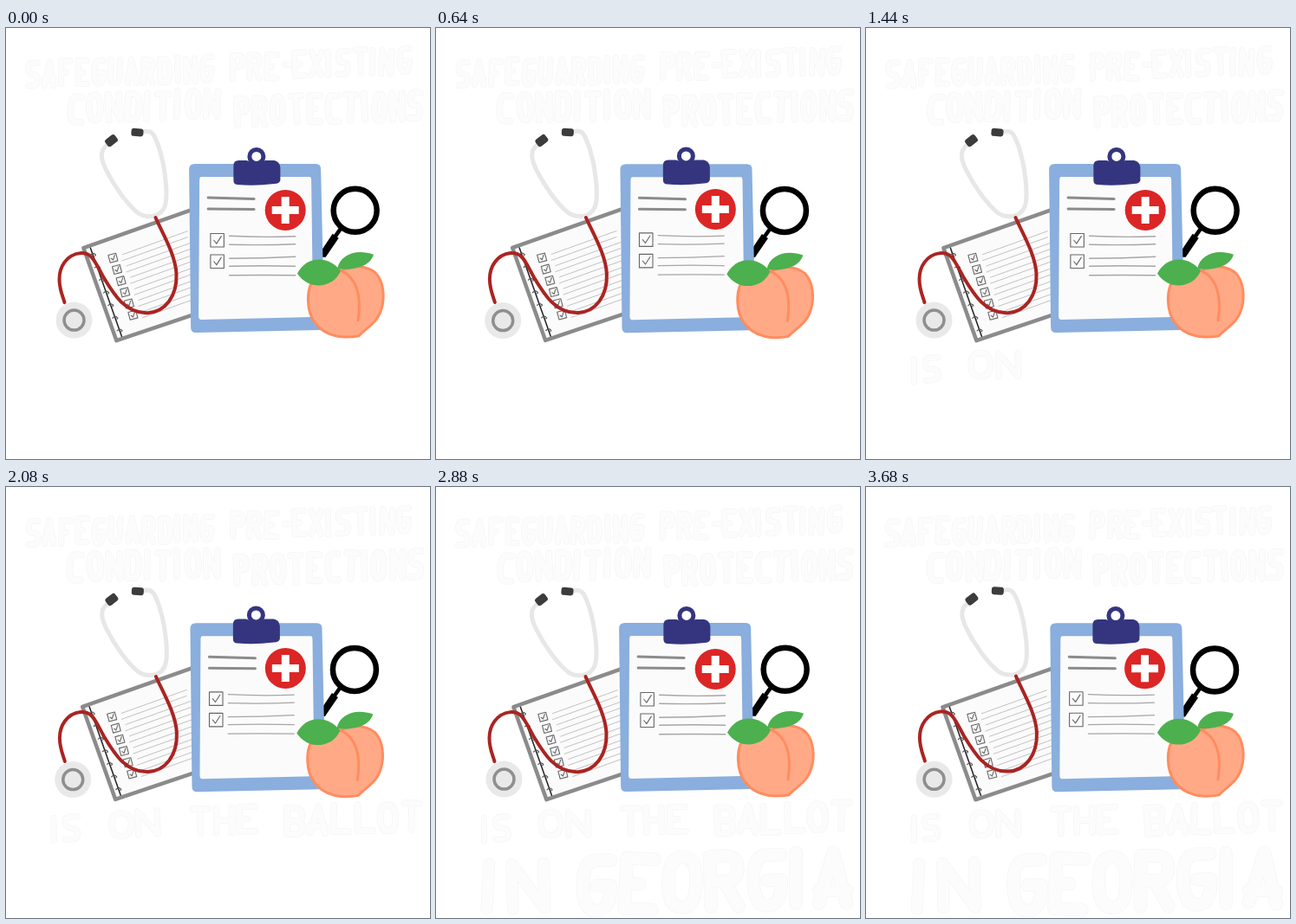
These frames come from a looping animation (489x498 px, 3.76 s). An HTML page:

```html
<!DOCTYPE html>
<html lang="en">
<head>
<meta charset="utf-8">
<title>On the ballot in Georgia</title>
<style>
  html, body { margin: 0; width: 100%; height: 100%; overflow: hidden; background: #fff; }
  svg { display: block; width: 489px; height: 498px; }
  path { stroke-linecap: round; stroke-linejoin: round; }
  .line { fill: none; }
  .paper { fill: #fbfbfb; }
  .rule { fill: none; stroke: #a6a6a6; stroke-width: 1.3; }
  .thin { fill: none; stroke: #c2c2c2; stroke-width: 1; }
  .box { fill: none; stroke: #666; stroke-width: 1.1; }
  .ring { fill: none; stroke: #555; stroke-width: 1.2; }
  .edge { fill: none; stroke: #f5f5f5; }
  .ink { fill: none; stroke: #fcfcfc; }
</style>
</head>
<body>
<svg viewBox="0 0 489 498" role="img" aria-label="Safeguarding pre-existing condition protections is on the ballot in Georgia">
  <g id="words"></g>

  <g class="part" id="notebook">
    <path class="paper" stroke="#8b8b8b" stroke-width="4.5" d="M89,254L222,207L222,329L127,361Z"/>
    <path class="line" stroke="#222" stroke-width="1.5" d="M97,254L133,356"/>
  </g>

  <g class="part line">
    <path stroke="#e7e7e7" stroke-width="5" d="M117,135C108,142 110,152 116,164C126,184 140,203 152,213C160,219 172,219 179,213C186,207 186,195 185,180C183,160 178,138 172,126C169,119 164,118 158,120"/>
    <path stroke="#aa2422" stroke-width="4" d="M173,219C181,237 196,262 197,284C198,310 184,328 164,329C138,330 125,308 113,288C103,270 100,259 86,260C70,262 62,276 62,290C62,302 66,310 68,317"/>
    <rect x="115" y="125" width="14" height="10" rx="3" fill="#3c3c3c" transform="rotate(-38 122 130)"/>
    <rect x="145" y="116" width="14" height="9" rx="3" fill="#3c3c3c" transform="rotate(4 152 120)"/>
  </g>
  <g class="part">
    <circle cx="78" cy="338" r="21" fill="#e9e9e9"/>
    <circle cx="78" cy="338" r="11.5" class="line" stroke="#8f8f8f" stroke-width="3.5"/>
  </g>

  <g class="part">
    <path d="M376,238L383,243L368,265L358,265Z"/>
    <path class="line" stroke="#000" stroke-width="4.5" d="M386,231L379,241"/>
    <circle cx="402" cy="211" r="25" class="line" stroke="#000" stroke-width="6.5"/>
  </g>

  <g class="part">
    <path fill="#8aaedd" d="M219,157L358,157Q364,157 364,163L368,344Q368,349 362,349L220,352Q214,352 214,346L212,163Q212,157 219,157Z"/>
    <path class="paper" d="M226,172L351,172Q353,172 353,176L355,331Q355,334 352,334L226,337Q223,337 223,333L224,176Q224,172 226,172Z"/>
    <path class="line" stroke="#8b8b8b" stroke-width="3" d="M234,196L287,197.500M234,209L287,209.500"/>
  </g>
  <g class="part">
    <circle cx="288.500" cy="148.500" r="8" class="line" stroke="#35357f" stroke-width="5"/>
    <path fill="#35357f" d="M268,153L277,153Q288,158 299,153L309,153Q315,154 316,161L316,176Q315,180 309,180Q286,183 267,181Q262,181 262,176L262,159Q262,153 268,153Z"/>
  </g>
  <g class="part">
    <circle cx="322" cy="210" r="23.500" fill="#dc2525"/>
    <path fill="#fff" d="M317.500,194.500h9v11h11v9h-11v11h-9v-11h-11v-9h11Z"/>
  </g>
  <g class="part" id="checks">
    <path class="rule" d="M257,240Q295,242 333,240.500M257,250Q295,251 333,249.500M257,266Q295,266 333,264M257,275Q295,274 333,275M257,285.500Q295,285 333,285.500"/>
  </g>

  <g class="part">
    <path fill="#ffa987" stroke="#ff8c5f" stroke-width="3" d="M387,281C400,273 416,275 426,283C436,293 437,312 433,325C429,340 418,345 407,356C398,358 384,358 377,355C360,350 349,336 348.500,316C348,303 351,294 358,288C366,281 378,278 387,281Z"/>
    <path class="line" stroke="#ff8c5f" stroke-width="3" d="M387,281C403,288 411,308 406,338"/>
    <path fill="#4cb04e" d="M336,284C346,264 371,262 386,281C379,299 351,306 336,284Z"/>
    <path fill="#4cb04e" d="M382,279C385,262 404,255 424,262C420,276 402,280 382,279Z"/>
  </g>
</svg>
<script>
const LOOP = 3760, STEP = 160, POSES = 9;
const FIRST_WORD = 960, WORD_GAP = 320, SLOPE = -.03;
const $ = id => document.getElementById(id);

// Strokes over a grid of 3 columns and 5 rows, a to o; a capital is a rounded corner
const glyphs = {
  A: "mbo jl", B: "mabCfIhg hIlOnm", C: "cbAgMno", D: "mabCiOnm", E: "camo gh",
  F: "cam gh", G: "cbAgMnOih", H: "am co gi", I: "am", L: "amo", N: "maoc",
  O: "bAgMnOiCb", P: "mabCfIhg", R: "mabCfIhg ho", S: "cbAdGhIlOnm",
  T: "ac bn", U: "ajMnOlc", X: "ao cm", "-": "gh"
};

// Seeded value from -1 to 1
function rand(n) {
  const v = Math.sin(n * 127.1 + 11.7) * 43758.5453;
  return (v - Math.floor(v)) * 2 - 1;
}

function add(parent, tag, attrs = {}) {
  const el = document.createElementNS("http://www.w3.org/2000/svg", tag);
  for (const k in attrs) el.setAttribute(k, attrs[k]);
  return parent.appendChild(el);
}

function glyphPath(ch, w, h) {
  return glyphs[ch].split(" ").map(stroke => {
    let cmd = "M";
    return [...stroke].map(c => {
      const n = c.toLowerCase().charCodeAt(0) - 97;
      const point = `${n % 3 * w / 2},${Math.floor(n / 3) * h / 4} `;
      const part = c < "a" ? "Q" + point : cmd + point;
      cmd = c < "a" ? "" : "L";
      return part;
    }).join("");
  }).join("");
}

const letters = [], words = [];

function word(text, x, y, advance, height, start = 0) {
  const g = add($("words"), "g"), weight = height * .21;
  const w = advance - weight - 1.5, h = height - weight;
  let dx = 0;
  for (const ch of text) {
    const d = glyphPath(ch, w, h), el = add(g, "g");
    add(el, "path", { d, class: "edge", "stroke-width": weight });
    add(el, "path", { d, class: "ink", "stroke-width": weight - 1.4 });
    letters.push({ el, x: x + dx + weight / 2, y: y + dx * SLOPE + weight / 2, w, h });
    dx += "I-".includes(ch) ? advance * .55 : advance;
  }
  words.push({ g, start });
}

const later = n => FIRST_WORD + n * WORD_GAP;
word("SAFEGUARDING", 22, 36, 19.1, 34);
word("PRE-EXISTING", 258, 27, 19.9, 34);
word("CONDITION", 70, 74, 22.2, 37);
word("PROTECTIONS", 262, 77, 21, 38);
word("IS", 52, 379, 23, 33, later(0));
word("ON", 118, 373, 31, 34, later(1));
word("THE", 212, 367, 27, 36, later(2));
word("BALLOT", 320, 366, 27, 38, later(3));
word("IN", 53, 429, 52, 66, later(4));
word("GEORGIA", 162, 423, 49, 74, later(5));

function tickBox(parent, x, y, size, angle) {
  const s = size / 2;
  add(parent, "path", {
    class: "box", transform: `translate(${x} ${y}) rotate(${angle})`,
    d: `M${-s},${-s}H${s}V${s}H${-s}ZM${-s * .5},0L${-s * .1},${s * .5}L${s * .6},${-s * .6}`
  });
}

for (let i = 0; i < 6; i++) {
  const x = 123 + i * 4.6, y = 265.5 + i * 13.2;
  tickBox($("notebook"), x, y, 9, -15);
  for (const k of [-4, 3]) {
    const end = Math.min(x + 86, 216);
    add($("notebook"), "path", { class: "thin", d: `M${x + 11},${y + k}L${end},${y + k - (end - x - 11) * .36}` });
  }
}
for (let i = 0; i < 7; i++) {
  add($("notebook"), "path", { class: "ring", d: `M${97 + i * 5.1},${262 + i * 14.6}q3,-3 5,-1q2,1 0,2` });
}
for (const y of [245, 269.5]) tickBox($("checks"), 243, y, 15.5, 0);

const parts = document.querySelectorAll(".part");

function draw(pose) {
  parts.forEach((el, i) => {
    const n = i * 17 + pose * 5;
    el.setAttribute("transform", `translate(${rand(n)} ${rand(n + 1) * .6})`);
  });
  letters.forEach((l, i) => {
    const r = k => rand(i * 31 + pose * 7 + k);
    const x = l.x + r(1) * .6, y = l.y + rand(i) + r(2) * .7;
    const turn = rand(i + 90) * 2.5 + r(3) * 1.5;
    l.el.setAttribute("transform", `translate(${x} ${y}) rotate(${turn} ${l.w / 2} ${l.h / 2})`);
  });
}

let last = -1;
function tick() {
  const t = performance.now() % LOOP, step = Math.floor(t / STEP);
  if (step !== last) {
    last = step;
    draw(step % POSES);
    for (const { g, start } of words) g.style.display = t >= start ? "" : "none";
  }
  requestAnimationFrame(tick);
}
tick();
</script>
</body>
</html>
```
